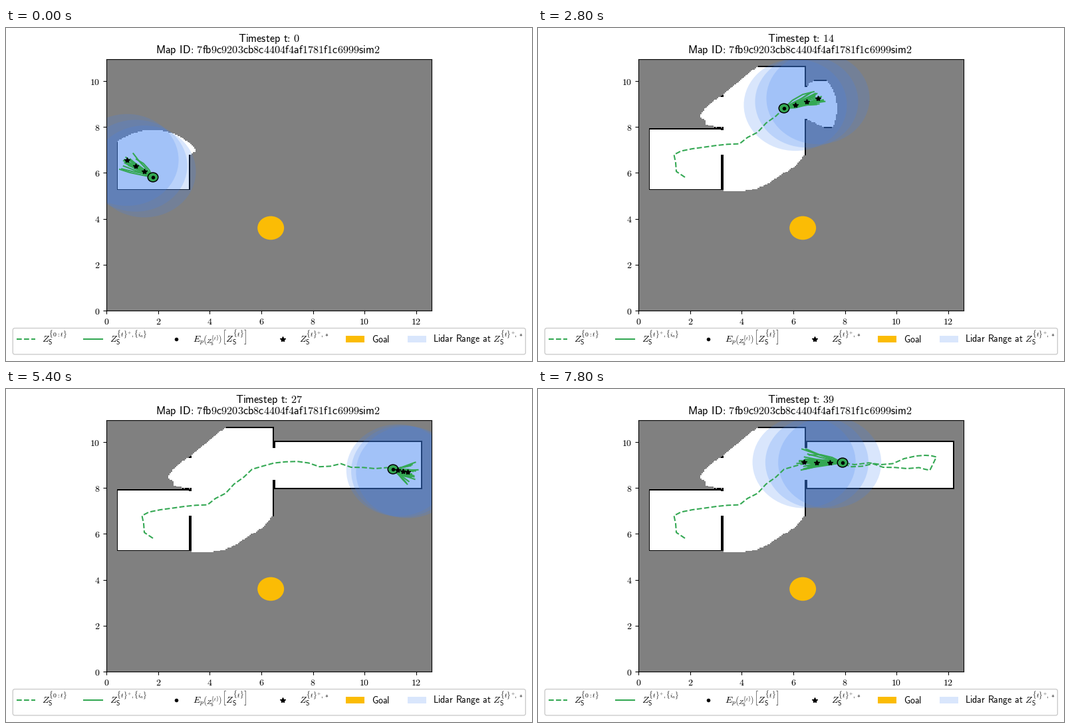
A matplotlib script that plays this animation: 791x502 px, repeating every 8 s.

```python
import numpy as np
import matplotlib.pyplot as plt
from matplotlib.animation import FuncAnimation
from matplotlib.collections import LineCollection
from matplotlib.patches import Circle, FancyBboxPatch, Rectangle

plt.rcParams["mathtext.fontset"] = "cm"

W, H, DPI = 791, 502, 100
STEPS = 40
GREEN, AMBER, BLUE = "#34a853", "#fbbc05", "#4285f4"
CELL, COLS, ROWS = 0.05, 252, 219
LEFT, BOTTOM, SX, SY = 151.4, 426, 38.77, 34.6
SIGHT = 2.03

# Robot positions in stage pixels, one per time step
TRACK = np.array([
    (221, 225), (208, 216.3), (207, 203), (204.5, 191), (215, 185.5),
    (232.3, 182), (249.5, 179.7), (267, 177.2), (285, 175.3), (303, 174.6),
    (315, 165), (330.3, 157.2), (343, 143.3), (357.5, 133), (370, 121),
    (387, 116), (403, 111.6), (420, 109.8), (438, 109.2), (455, 111.5),
    (471.5, 117.2), (488, 116.4), (503.5, 112.6), (519, 118), (537, 118.3),
    (555, 120), (573, 118.5), (582, 121), (589.3, 122.5), (594.5, 112),
    (599, 102.5), (591, 100.5), (582, 100), (568.3, 101), (550.5, 105),
    (533.5, 112.5), (516, 114), (497.5, 111.3), (476, 114), (458, 111),
    (438.7, 110.8),
])
PATH = np.column_stack([(TRACK[:, 0] - LEFT) / SX, (BOTTOM - TRACK[:, 1]) / SY])


def build_walls():
    walls = np.zeros((ROWS, COLS), bool)
    blocks = [  # row0, row1, col0, col1
        (104, 160, 7, 9), (104, 106, 7, 66), (158, 160, 7, 66),
        (104, 136, 64, 66), (157, 160, 64, 66), (186, 214, 64, 66),
        (212, 214, 64, 131), (90, 167, 129, 131), (195, 214, 129, 131),
        (158, 160, 129, 246), (200, 202, 129, 246), (158, 202, 244, 246),
    ]
    for r0, r1, c0, c1 in blocks:
        walls[r0:r1, c0:c1] = True
    return walls


def scan(pos, walls):
    """Cells reached by rays cast from pos, up to the first wall cell."""
    ang = np.linspace(0, 2 * np.pi, 1800, endpoint=False)[:, None]
    dist = np.arange(0, SIGHT, 0.015)
    col = np.clip((pos[0] + dist * np.cos(ang)) / CELL, 0, COLS - 1).astype(int)
    row = np.clip((pos[1] + dist * np.sin(ang)) / CELL, 0, ROWS - 1).astype(int)
    hit = walls[row, col]
    # keep every sample that falls inside the first wall cell or before it
    lit = np.cumsum(hit, axis=1) - hit == 0
    seen = np.zeros_like(walls)
    seen[row[lit], col[lit]] = True
    return seen


def build_maps():
    walls = build_walls()
    known = np.zeros_like(walls)
    maps = []
    for pos in PATH[:STEPS]:
        known = known | scan(pos, walls)
        maps.append(np.where(known, np.where(walls, 0, 255), 128))
    return maps


def sample_plans(t, n=20):
    """Random three-step plans fanning out along the next move."""
    rng = np.random.default_rng(100 + t)
    dx, dy = PATH[t + 1] - PATH[t]
    step = np.hypot(dx, dy)
    loose = np.clip(1 - step / 0.4, 0, 1)
    turn = (0.11 + 0.5 * loose) * rng.standard_normal((n, 1))
    turn = turn + np.cumsum(0.1 * rng.standard_normal((n, 3)), axis=1)
    turn[0] = rng.choice([-1, 1]) * np.array([0.5, 0.25, -0.05])
    ang = np.arctan2(dy, dx) + turn
    speed = max(step, 0.28) * (1 + 0.08 * rng.standard_normal((n, 1)))
    moves = np.stack([speed * np.cos(ang), speed * np.sin(ang)], axis=2)
    start = np.zeros((n, 1, 2))
    return PATH[t] + np.concatenate([start, np.cumsum(moves, axis=1)], axis=1)


def sans(text):
    body = text.replace(":", r"\hspace{-0.2}:\hspace{-0.2}")
    return r"\mathsf{" + body.replace(" ", r"\hspace{0.38}") + "}"


def state(sup):
    return r"Z_{\mathsf{S}}^{" + sup + "}"


# The small excess keeps float rounding from losing a pixel row
fig = plt.figure(figsize=((W + 0.01) / DPI, (H + 0.01) / DPI), dpi=DPI,
                 facecolor="white")

page = fig.add_axes([0, 0, 1, 1])
page.set(xlim=(0, W), ylim=(H, 0))
page.axis("off")

ax = fig.add_axes([LEFT / W, 1 - BOTTOM / H,
                   COLS * CELL * SX / W, ROWS * CELL * SY / H])


def label(x, y, text, size=10, **kw):
    return page.text(x, y, f"${text}$", fontsize=size, va="baseline", **kw)


def draw_legend():
    page.add_patch(FancyBboxPatch(
        (10.3, 452.5), 771, 39.5, boxstyle="round,pad=0,rounding_size=2.8",
        fc="white", ec="0.8", lw=1))
    mid, base = 469.3, 474
    page.plot([16, 43.8], [mid, mid], "--", color=GREEN, lw=1.5)
    page.plot([117, 144.8], [mid, mid], color=GREEN, lw=1.5)
    page.plot(256, mid, "k.")
    page.plot(416.3, mid, "k*")
    page.add_patch(Rectangle((511, 464.3), 28, 9.7, fc=AMBER, lw=0))
    page.add_patch(Rectangle((604, 464.3), 28, 9.7, fc=BLUE, alpha=0.2, lw=0))

    now, best = state(r"\{t\}"), state(r"\{t\}^{+},*")
    label(54, base, state(r"\{0:t\}"))
    label(156, base, state(r"\{t\}^{+},\{i_a\}"))
    label(281, base, r"E_{p\left(" + now + r"\right)}\left[" + now + r"\right]")
    label(441, base, best)
    label(550, base, sans("Goal"))
    label(642, base, sans("Lidar Range at ") + best)


draw_legend()
title = label(396, 21.3, sans("Timestep t: 0"), 11.7, ha="center")
label(394.3, 38.4, sans("Map ID: 7fb9c9203cb8c4404f4af1781f1c6999sim2"),
      11.7, ha="center")

maps = build_maps()
grid = ax.imshow(maps[0], cmap="gray", vmin=0, vmax=255, origin="lower",
                 extent=(0, COLS * CELL, 0, ROWS * CELL), aspect="auto",
                 interpolation="nearest")
ax.set(xlim=(0, COLS * CELL), ylim=(0, ROWS * CELL))
ax.set_xticks(range(0, 13, 2), [f"${v}$" for v in range(0, 13, 2)])
ax.set_yticks(range(0, 11, 2), [f"${v}$" for v in range(0, 11, 2)])

ax.add_patch(Circle((6.365, 3.6), 0.515, fc=AMBER, lw=0, zorder=2))
ranges = [ax.add_patch(Circle((0, 0), 2, fc=BLUE, alpha=0.2, lw=0, zorder=2))
          for _ in range(3)]
trail, = ax.plot([], [], "--", color=GREEN, lw=1.5, zorder=3)
plans = ax.add_collection(LineCollection([], colors=GREEN, linewidths=1.5, zorder=4))
robot = ax.add_patch(Circle((0, 0), 0.2, fc=GREEN, ec="black", lw=1.1, zorder=5))
dot, = ax.plot([], [], "k.", zorder=6)
stars, = ax.plot([], [], "k*", zorder=6)


def update(t):
    pos, ahead = PATH[t], PATH[t + 1] - PATH[t]
    best = pos + np.outer([1, 2, 3], ahead)
    title.set_text(f"${sans(f'Timestep t: {t}')}$")
    grid.set_data(maps[t])
    for ring, centre in zip(ranges, best):
        ring.center = tuple(centre)
    trail.set_data(*PATH[:t + 1].T)
    plans.set_segments(list(sample_plans(t)))
    robot.center = tuple(pos)
    dot.set_data([pos[0]], [pos[1]])
    stars.set_data(*best.T)
    return [title, grid, trail, plans, robot, dot, stars, *ranges]


anim = FuncAnimation(fig, update, frames=STEPS, interval=200, repeat=True)
plt.show()
```
